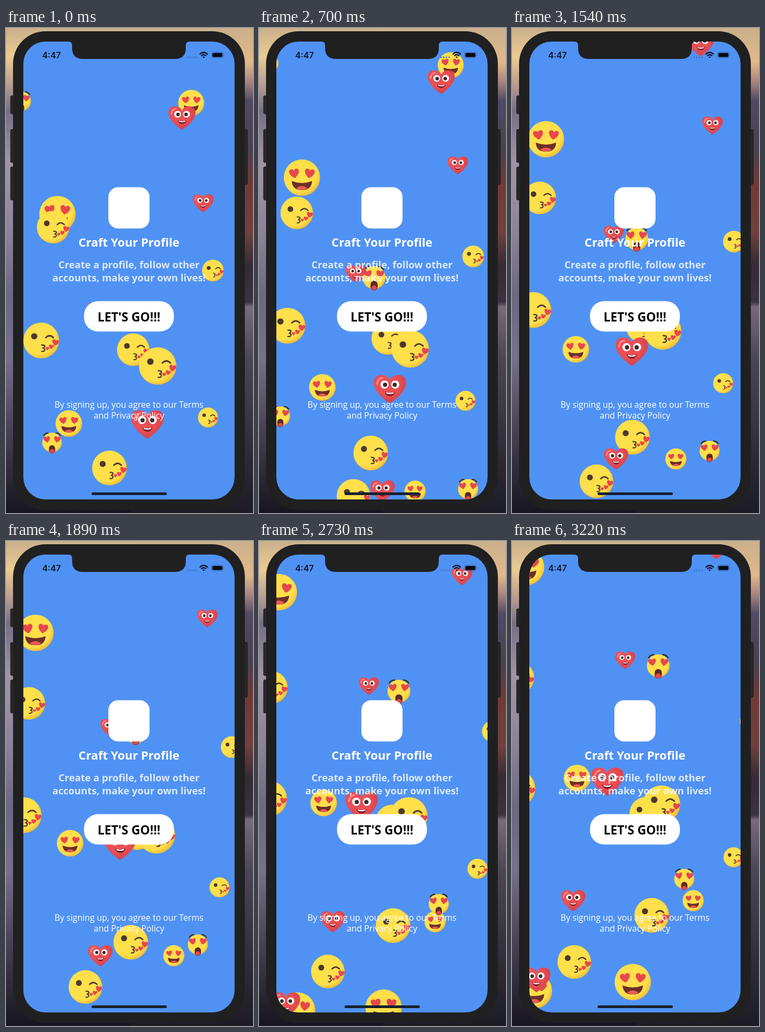
Write an HTML page that moves like this. It is 456x894 px and loops after 3.29 s.

```html
<!DOCTYPE html>
<html lang="en">
<head>
<meta charset="utf-8">
<title>Craft Your Profile</title>
<style>
  html, body { margin: 0; width: 100%; height: 100%; overflow: hidden; background: #1f1f20; }
  svg { display: block; width: 100vw; height: 100vh; }
  text { font-family: "Open Sans", "Noto Sans", sans-serif; font-weight: 700; fill: #fff; text-anchor: middle; }
  .lead { font-size: 18.2px; fill: #fff; fill-opacity: .8; }
  .terms { font-size: 15.7px; font-weight: 500; }
  .clock { font: 600 15.6px Inter, Roboto, sans-serif; fill: #0b1526; }
</style>
</head>
<body>
<svg viewBox="0 0 456 894" preserveAspectRatio="none">
  <defs>
    <linearGradient id="west" x2="0" y2="1">
      <stop offset="0" stop-color="#c9b08c"/>
      <stop offset=".06" stop-color="#eccb92"/>
      <stop offset=".12" stop-color="#b59a92"/>
      <stop offset=".17" stop-color="#776f86"/>
      <stop offset=".28" stop-color="#a294a6"/>
      <stop offset=".42" stop-color="#8c839a"/>
      <stop offset=".55" stop-color="#6c6880"/>
      <stop offset=".68" stop-color="#77708a"/>
      <stop offset=".82" stop-color="#4b4459"/>
      <stop offset="1" stop-color="#17151f"/>
    </linearGradient>
    <linearGradient id="east" x2="0" y2="1">
      <stop offset="0" stop-color="#c9b08c"/>
      <stop offset=".07" stop-color="#e2b98a"/>
      <stop offset=".11" stop-color="#a98582"/>
      <stop offset=".15" stop-color="#514a62"/>
      <stop offset=".25" stop-color="#4a4053"/>
      <stop offset=".32" stop-color="#6f3a38"/>
      <stop offset=".42" stop-color="#70413e"/>
      <stop offset=".49" stop-color="#352a36"/>
      <stop offset=".565" stop-color="#3b3340"/>
      <stop offset=".575" stop-color="#776a7c"/>
      <stop offset=".68" stop-color="#4b4656"/>
      <stop offset="1" stop-color="#1d1b24"/>
    </linearGradient>
    <radialGradient id="skin" cx=".42" cy=".4" r=".62">
      <stop offset=".78" stop-color="#ffdf4a"/>
      <stop offset="1" stop-color="#f3bd35"/>
    </radialGradient>
    <radialGradient id="rose" cx=".4" cy=".35" r=".7">
      <stop offset=".5" stop-color="#ea4f55"/>
      <stop offset="1" stop-color="#d23e48"/>
    </radialGradient>
    <clipPath id="screen"><rect x="32" y="25" width="390" height="844" rx="41"/></clipPath>

    <path id="heart" d="M0 .9C-1.3 0-1.1-.9-.5-.9-.2-.9 0-.7 0-.5 0-.7.2-.9.5-.9 1.1-.9 1.3 0 0 .9Z"/>
    <g id="heartEyes" fill="#e5484d">
      <use href="#heart" transform="translate(-13.5 -7) rotate(-8) scale(9)"/>
      <use href="#heart" transform="translate(13.5 -7) rotate(8) scale(9)"/>
    </g>

    <!-- Sticker faces, each about 32 units in radius -->
    <g id="grin">
      <circle r="32" fill="url(#skin)"/>
      <use href="#heartEyes"/>
      <path d="M-18 6Q0 13 18 6 17 22 0 22-17 22-18 6Z" fill="#6d2f28"/>
      <path d="M-10 18.5Q0 11 10 18.5 6 22 0 22-6 22-10 18.5Z" fill="#ee5a55"/>
    </g>
    <g id="kiss">
      <circle r="32" fill="url(#skin)"/>
      <circle cx="-12.5" cy="-7.5" r="5.6" fill="#4b3a2c"/>
      <g fill="none" stroke="#4b3a2c" stroke-width="2.6" stroke-linecap="round">
        <path d="M8-5Q15-12 22-5"/>
        <path d="M1 8Q8 8 6 11.5 5 13.5 2.500 13.500 7.500 14 6 18 5 20 1 19.500" stroke-width="2.200"/>
      </g>
      <g fill="#e5484d">
        <use href="#heart" transform="translate(11 14.500) scale(3.300)"/>
        <use href="#heart" transform="translate(18 11.500) rotate(8) scale(4.500)"/>
        <use href="#heart" transform="translate(25.500 4) rotate(12) scale(6.200)"/>
      </g>
    </g>
    <g id="wow">
      <circle r="32" fill="url(#skin)"/>
      <path d="M-27-23Q-22-31-13-31M27-23Q22-31 13-31" fill="none" stroke="#3c3128" stroke-width="4" stroke-linecap="round"/>
      <use href="#heartEyes" transform="translate(0 -1) scale(1.250)"/>
      <rect x="-10" y="9" width="20" height="27" rx="10" fill="#5b2a25"/>
      <path d="M-8 28Q0 15 8 28 7 35 0 35-7 35-8 28Z" fill="#e5484d"/>
    </g>
    <g id="love">
      <use href="#heart" transform="scale(33 31)" fill="url(#rose)"/>
      <path d="M-25-10Q-24-21-15-22" fill="none" stroke="#f58d8c" stroke-width="3.500" stroke-linecap="round"/>
      <g fill="#fff"><circle cx="-10.500" cy="-9" r="8"/><circle cx="10.500" cy="-9" r="8"/></g>
      <g fill="#3a2a2a"><circle cx="-9.500" cy="-8.500" r="4.200"/><circle cx="9.500" cy="-8.500" r="4.200"/></g>
      <path d="M-10 5Q0 9 10 5 8 14 0 14-8 14-10 5Z" fill="#7c1f2b"/>
      <path d="M-8 6Q0 9 8 6L7 8.500Q0 11-7 8.500Z" fill="#fff"/>
    </g>
  </defs>

  <rect width="228" height="894" fill="url(#west)"/>
  <rect x="228" width="228" height="894" fill="url(#east)"/>

  <g fill="#29292b" stroke="#151516">
    <rect x="8.500" y="125" width="8" height="33" rx="2"/>
    <rect x="8.500" y="187" width="8" height="61" rx="2"/>
    <rect x="8.500" y="256" width="8" height="61" rx="2"/>
    <rect x="437" y="187" width="8.500" height="101" rx="2"/>
  </g>
  <rect x="13" y="6" width="428" height="882" rx="60" fill="#202021"/>

  <g clip-path="url(#screen)">
    <rect x="32" y="25" width="390" height="844" fill="#5092f4"/>
    <g id="stickers"></g>

    <rect x="189" y="293.500" width="76" height="76" rx="18" fill="#fff"/>
    <text x="227" y="403" font-size="21.700">Craft Your Profile</text>
    <text class="lead" x="227" y="442.500">Create a profile, follow other</text>
    <text class="lead" x="227" y="466.500">accounts, make your own lives!</text>
    <rect x="144" y="503.500" width="166" height="56" rx="26" fill="#fff"/>
    <text x="227" y="541" font-size="22.500" style="fill:#050505">LET'S GO!!!</text>
    <text class="terms" x="227" y="700">By signing up, you agree to our Terms</text>
    <text class="terms" x="227" y="720">and Privacy Policy</text>

    <text class="clock" x="84" y="55.500">4:47</text>
    <g fill="#3f73c4">
      <circle cx="336" cy="54" r="1.500"/><circle cx="341" cy="54" r="1.500"/>
      <circle cx="346" cy="54" r="1.500"/><circle cx="351" cy="54" r="1.500"/>
    </g>
    <g fill="none" stroke="#0b1526" stroke-width="2.400">
      <path d="M357.500 48.500Q365 41.500 372.500 48.500M360.300 51.500Q365 47 369.700 51.500"/>
      <path d="M365 55.500L362.800 53.300Q365 51.500 367.200 53.300Z" fill="#0b1526" stroke="none"/>
    </g>
    <rect x="379.500" y="44.500" width="21.500" height="10.500" rx="3" fill="none" stroke="#3a62a3"/>
    <rect x="381" y="46" width="18.500" height="7.500" rx="1.800" fill="#050a12"/>
    <path d="M402.300 48V52Q404 50 402.300 48Z" fill="#3a62a3"/>
    <rect x="158" y="856" width="139" height="5" rx="2.500" fill="#17202f"/>

    <path d="M115 24V25Q122 25 122 32V37Q122 57 142 57H312Q332 57 332 37V32Q332 25 339 25V24Z" fill="#202021"/>
  </g>
</svg>
<script>
  const STEP = 70, STEPS = 47;

  // Uneven pacing: [step, share of the full drift]
  const pace = [[0, 0], [5, .115], [15, .341], [22, .468], [32, .71], [39, .843], [46, 1]];

  // kind, x, y, drift x, drift y, radius; grouped by the step at which they are released
  const bursts = [
    [0, [
      ['grin', 342, 138, 53, -305, 24],
      ['love', 325, 166, 50, -290, 25],
      ['grin', 95, 343, -69, -295, 33.5],
      ['kiss', 87, 367, -76, -115, 30],
      ['love', 364, 323, 13, -306, 19],
      ['kiss', 382, 447, 59, -114, 20],
      ['kiss', 65, 576, -55, -120, 33],
      ['kiss', 235, 593, 12, -91, 30],
      ['kiss', 280, 623, -4, -138, 34.5],
      ['kiss', 373, 718, 36, -135, 18.5],
      ['wow', 28, 135, -45, -305, 18],
      ['wow', 195.4, 528, 74.6, -298, 21],
      ['love', 169.5, 522, 39.5, -302, 18.5],
      ['grin', 116, 729, 4, -292, 24.5],
      ['wow', 85, 764, -200, -213, 18],
      ['love', 261, 731, -85, -287, 30],
      ['kiss', 191, 811, 67, -121, 32]
    ]],
    [7, [
      ['kiss', 192, 888, -77, -112, 31],
      ['love', 262, 910, -149, -247, 22.5],
      ['grin', 274.5, 910, 60, -247, 19.5],
      ['wow', 406, 917, -88, -294, 18.5]
    ]],
    [38, [
      ['grin', 231, 1058, -190, -229, 33],
      ['love', 77, 1102, -32, -293, 26],
      ['grin', 268, 1113, -45, -300, 33.5]
    ]]
  ];

  const layer = document.getElementById('stickers');
  const stickers = bursts.flatMap(([born, list]) => list.map(([kind, x, y, dx, dy, r]) => {
    const node = document.createElementNS('http://www.w3.org/2000/svg', 'use');
    node.setAttribute('href', '#' + kind);
    layer.append(node);
    return { node, born, x, y, dx, dy, scale: r / 32 };
  }));

  function drift(step) {
    const i = Math.max(1, pace.findIndex(([s]) => s >= step));
    const [s0, u0] = pace[i - 1], [s1, u1] = pace[i];
    return u0 + (u1 - u0) * (step - s0) / (s1 - s0);
  }

  function render(ms) {
    const step = Math.floor(ms / STEP) % STEPS;
    const u = drift(step);
    for (const { node, born, x, y, dx, dy, scale } of stickers) {
      node.setAttribute('visibility', step < born ? 'hidden' : 'visible');
      node.setAttribute('transform', `translate(${x + dx * u} ${y + dy * u}) scale(${scale})`);
    }
  }

  const start = performance.now();
  function loop() {
    render(performance.now() - start);
    requestAnimationFrame(loop);
  }
  loop();
</script>
</body>
</html>
```
